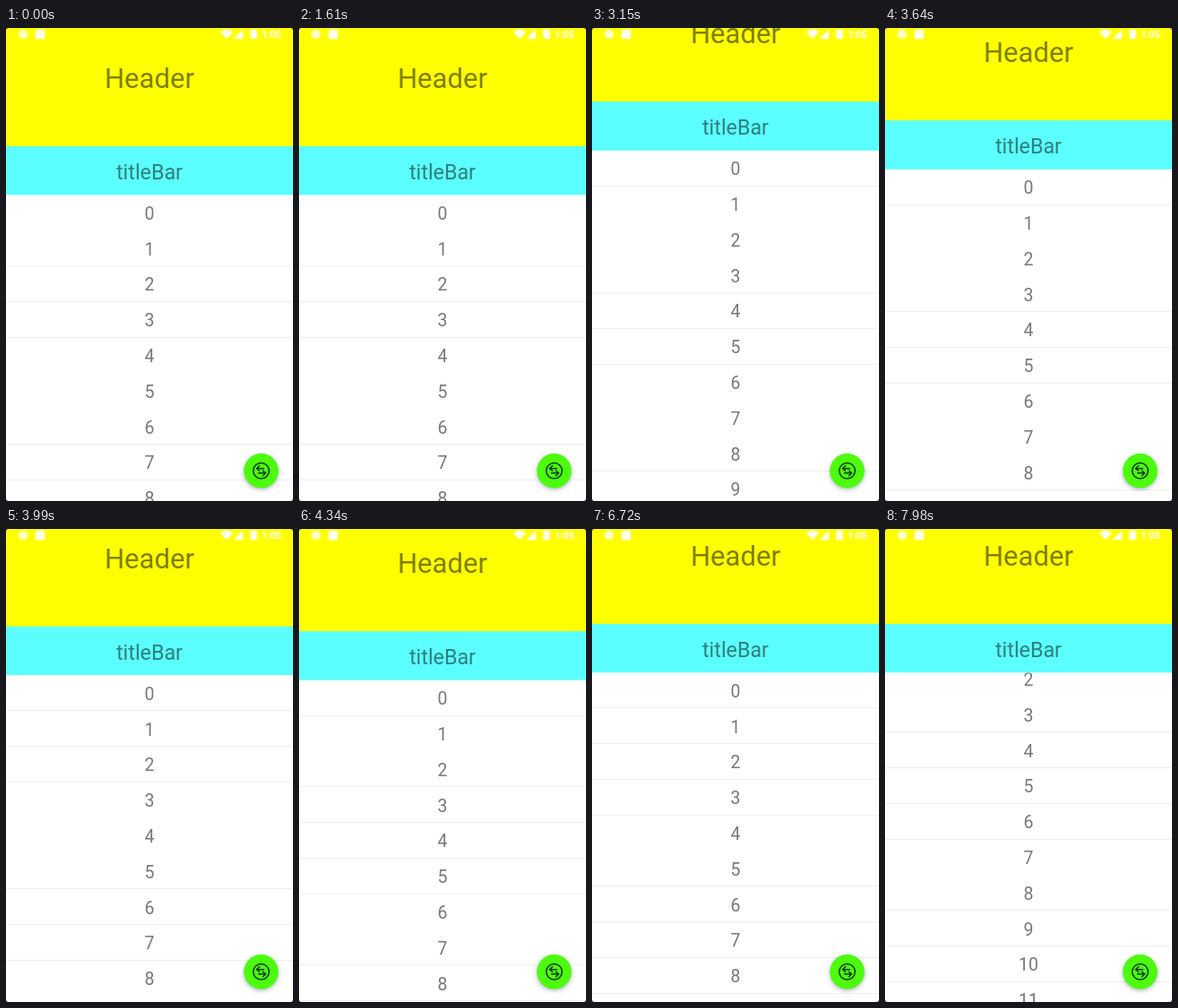
Animation, 320 px wide and 528 px high, one loop 8000 ms. Source, as an HTML page with a canvas:

```html
<!DOCTYPE html>
<html lang="en">
<head>
<meta charset="utf-8">
<style>
  html, body { margin: 0; width: 100%; height: 100%; overflow: hidden; background: #fff; }
  canvas { display: block; }
</style>
</head>
<body>
<canvas id="stage" width="320" height="528"></canvas>
<script>
const ctx = document.getElementById('stage').getContext('2d');
const W = 320, H = 528, LOOP = 8000, STEP = 70;
const BAR = 54.5, ROW = 39.8, ROWS = 20;

// [time, value] pairs, eased in between
const headerKeys = [[1680, 132], [2660, 61.4], [3640, 103.4], [4340, 114.33],
  [4830, 153], [5460, 153], [6300, 105.93]];
const scrollKeys = [[7420, 0], [7980, 92.4]];

function valueAt(keys, t) {
  if (t <= keys[0][0]) return keys[0][1];
  for (let i = 1; i < keys.length; i++) {
    const [t0, a] = keys[i - 1], [t1, b] = keys[i];
    if (t < t1) {
      const p = (t - t0) / (t1 - t0);
      return a + (b - a) * p * p * (3 - 2 * p);
    }
  }
  return keys[keys.length - 1][1];
}

function rect(x, y, w, h, color) {
  ctx.fillStyle = color;
  ctx.fillRect(x, y, w, h);
}

function label(text, y, size, color) {
  ctx.font = `${size}px Roboto, sans-serif`;
  ctx.textAlign = 'center';
  ctx.fillStyle = color;
  ctx.fillText(text, W / 2, y);
}

function disc(x, y, r, color) {
  ctx.fillStyle = color;
  ctx.beginPath();
  ctx.arc(x, y, r, 0, 7);
  ctx.fill();
}

function poly(points, color) {
  ctx.fillStyle = color;
  ctx.beginPath();
  points.forEach(([x, y]) => ctx.lineTo(x, y));
  ctx.fill();
}

function drawList(top, scroll) {
  rect(0, top, W, H - top, '#fff');
  ctx.save();
  ctx.beginPath();
  ctx.rect(0, top, W, H - top);
  ctx.clip();
  for (let i = 0; i < ROWS; i++) {
    const y = top + 39.35 + i * ROW - scroll;
    label(i, y - 12, 19.45, '#787878');
    // hairlines that straddle two pixels vanish
    const part = y - Math.floor(y);
    if (part >= 0.15 && part < 0.8) rect(0, Math.floor(y), W, 1, '#efefef');
  }
  ctx.restore();
}

function drawStatus() {
  const pale = 'rgba(255,255,255,.75)';
  ctx.save();
  ctx.shadowColor = '#fff';
  ctx.shadowBlur = 3;
  disc(19, 7, 5, 'rgba(255,255,255,.55)');
  poly([[35, 2], [43, 2], [43, 12], [33, 12], [33, 4]], pale);
  poly([[239, 4], [246, 1.5], [253, 4], [246, 12]], pale);
  poly([[264, 2], [264, 12], [254, 12]], pale);
  rect(272.5, 2, 7, 10, pale);
  ctx.font = '500 11px Roboto, sans-serif';
  ctx.textAlign = 'center';
  ctx.fillStyle = pale;
  ctx.fillText('1:05', 296, 11);
  ctx.restore();
}

function drawButton() {
  const x = 284.5, y = 494.3;
  ctx.save();
  ctx.shadowColor = 'rgba(0,40,60,.35)';
  ctx.shadowBlur = 5;
  ctx.shadowOffsetY = 1.5;
  disc(x, y, 19.3, '#4dfb0d');
  ctx.restore();
  ctx.save();
  ctx.translate(x, y);
  ctx.strokeStyle = '#103a20';
  ctx.lineWidth = 1.5;
  ctx.beginPath();
  ctx.arc(0, 0, 8.8, 0, 7);
  ctx.stroke();
  for (let i = 0; i < 2; i++) {
    ctx.beginPath();
    ctx.moveTo(-1.5, -6);
    ctx.lineTo(-5, -2.5);
    ctx.lineTo(-1.5, 0.5);
    ctx.moveTo(-5, -2.5);
    ctx.lineTo(3.5, -2.5);
    ctx.stroke();
    ctx.rotate(Math.PI);
  }
  ctx.restore();
}

function drawCorners() {
  for (const x of [0, W]) for (const y of [0, H]) {
    const dx = x ? -2 : 2, dy = y ? -2 : 2;
    poly([[x, y], [x + dx, y], [x, y + dy]], '#555');
  }
}

function draw(t) {
  const h = valueAt(headerKeys, t);
  rect(0, 0, W, h, '#ff0');
  label('Header', h - 65, 31.1, 'rgba(0,0,0,.5)');
  rect(0, h, W, BAR, '#5cffff');
  label('titleBar', h + 36.8, 23.3, 'rgba(0,0,0,.5)');
  drawList(h + BAR, valueAt(scrollKeys, t));
  drawStatus();
  drawButton();
  drawCorners();
}

const start = performance.now();
function tick() {
  const t = (performance.now() - start) % LOOP;
  draw(Math.floor(t / STEP) * STEP);
  requestAnimationFrame(tick);
}
tick();
</script>
</body>
</html>
```
